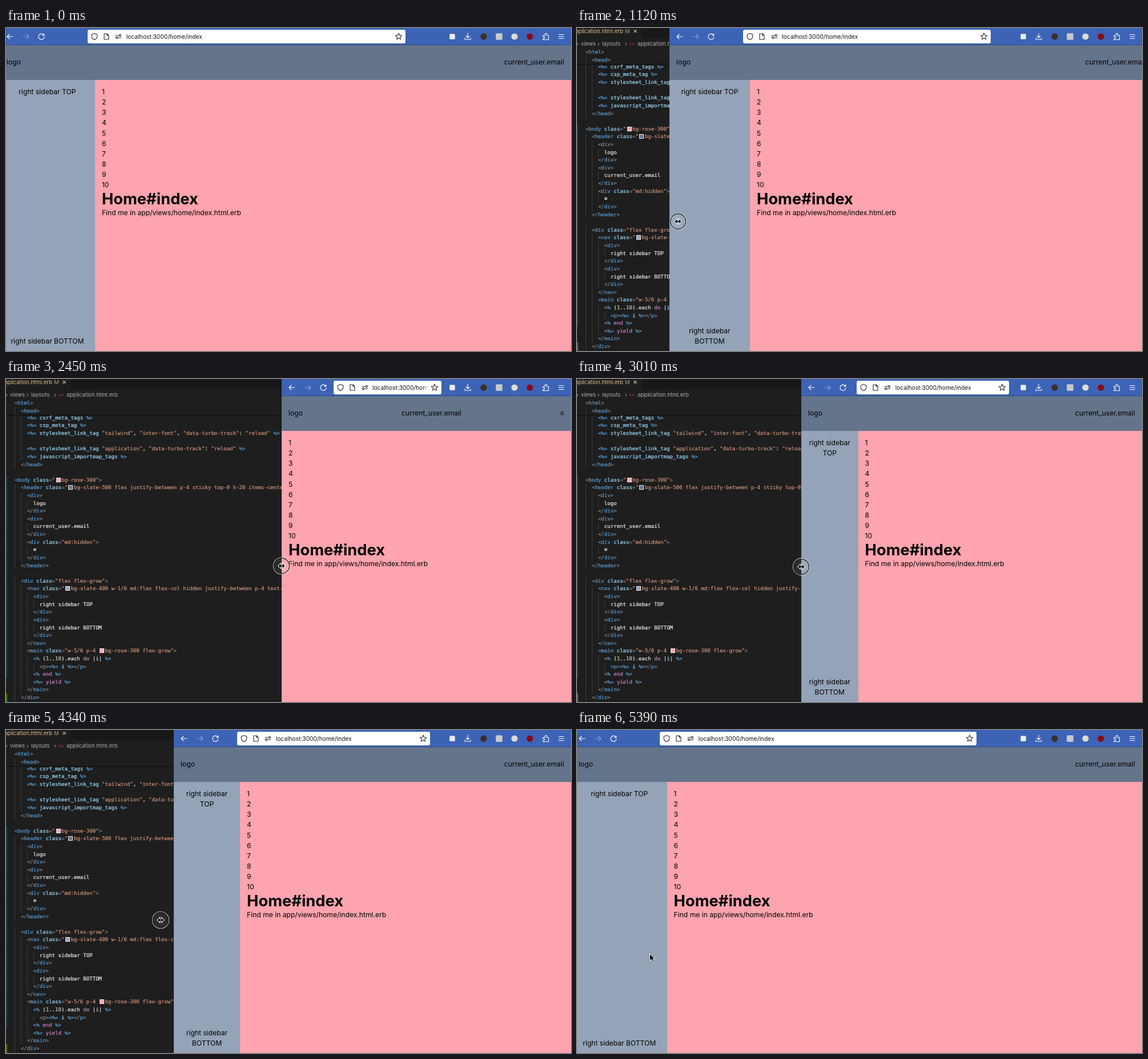
An HTML page for the animation above (5.46 s loop, 990x566 px).

```html
<!DOCTYPE html>
<html lang="en">
<head>
<meta charset="utf-8">
<title>Responsive layout demo</title>
<style>
* { box-sizing: border-box; margin: 0; padding: 0; }
html, body { width: 100%; height: 100%; overflow: hidden; background: #1e1e1e; }
body { position: relative; font-family: Inter, "Open Sans", sans-serif; }
svg { display: block; }
.abs, .icon, .line, .guide { position: absolute; }

#editor { inset: 0; width: 990px; height: 566px; overflow: hidden; background: #1e1e1e; }
#tabs { left: 0; right: 0; top: 0; height: 18px; background: #181818; }
#tab { left: 0; top: 0; width: 113px; height: 18px; background: #1e1e1e; }
.label { position: absolute; font-size: 9.6px; line-height: 14px; white-space: pre; color: #adadad; }
.line { font: 9.08px/13.62px "DejaVu Sans Mono", monospace; white-space: pre; color: #ececec; -webkit-text-stroke: .22px; }
.guide { width: 1px; height: 13.7px; background: #3c3c3c; }
.sw { display: inline-block; width: 8px; height: 8px; margin: 0 1.5px; border: 1px solid #eee; vertical-align: -1px; }

#win { top: 0; right: 0; height: 566px; overflow: hidden; background: #fda4ae; }
#bar { left: 0; right: 0; top: 0; height: 30px; background: #3c63b5; border-bottom: 1px solid #2d4b8d; }
#field { top: 2.5px; height: 24px; background: #fff; border-radius: 3px; box-shadow: 0 0 1px #0006; }
#url { left: 68px; right: 24px; top: 0; line-height: 24px; font-size: 10.24px; color: #15141a; white-space: pre; overflow: hidden; }
#url i { position: absolute; right: 0; top: 0; width: 9px; height: 24px; background: linear-gradient(90deg, #fff0, #fff); }
.icon { width: 16px; height: 16px; fill: none; stroke-width: 1.1; stroke-linecap: round; stroke-linejoin: round; }

#page { left: 0; top: 30px; height: 540px; display: flex; flex-direction: column; font-size: 12.11px; line-height: 18.16px; color: #000; }
#page header { flex: none; height: 60.8px; padding: 0 12.1px; display: flex; justify-content: space-between; align-items: center; background: #64748b; white-space: nowrap; }
#page section { flex: 1; display: flex; }
#page nav { flex: none; width: 16.6667%; padding: 12.1px; display: flex; flex-direction: column; justify-content: space-between; text-align: center; background: #94a3b8; }
#page main { flex: 1; min-width: 0; padding: 12.1px; background: #fda4ae; white-space: nowrap; }
#page h1 { position: relative; top: .5px; font-size: 27.25px; line-height: 30.3px; font-weight: 700; }
#page .burger { display: none; }
#page.small nav { display: none; }
#page.small .burger { display: block; }
#ring, #arrow { left: 0; top: 0; overflow: visible; }
</style>
</head>
<body>
<div id="editor" class="abs">
  <div id="tabs" class="abs"><div id="tab" class="abs"></div></div>
</div>
<div id="win" class="abs">
  <div id="bar" class="abs">
    <div id="field" class="abs"><div id="url" class="abs">localhost:3000/home/index<i></i></div></div>
  </div>
  <div id="page" class="abs">
    <header><div>logo</div><div>current_user.email</div><div class="burger">≡</div></header>
    <section>
      <nav><div>right sidebar TOP</div><div>right sidebar BOTTOM</div></nav>
      <main><div id="nums"></div><h1>Home#index</h1><p>Find me in app/views/home/index.html.erb</p></main>
    </section>
  </div>
</div>
<svg id="ring" class="abs" width="1" height="1">
  <circle r="14.5" fill="#fff1" stroke="#fff" stroke-opacity=".85" stroke-width="1.1"/>
  <circle r="13.6" fill="none" stroke="#111" stroke-width="1.2"/>
  <path d="M-5.6 0L-1.8-3.8V-1H1.8V-3.8L5.6 0L1.8 3.8V1H-1.8V3.8Z" fill="#000" stroke="#fff" stroke-width="1.8" paint-order="stroke"/>
</svg>
<svg id="arrow" class="abs" width="1" height="1">
  <path d="M0 0V10.4L2.4 8.2L4 12L5.7 11.3L4.1 7.6H7.3Z" fill="#000" stroke="#fff" stroke-width="1.4" paint-order="stroke"/>
</svg>
<script>
const $ = id => document.getElementById(id);
const LOOP = 5460, STEP = 70, STAGE = 990;
const CHAR = 5.47, ROW = 13.62, CODE_X = 15;

function add(parent, cls, html, style) {
  const el = document.createElement('div');
  el.className = cls;
  el.innerHTML = html;
  Object.assign(el.style, style);
  parent.append(el);
  return el;
}

// ---- editor ----
const esc = s => s.replace(/&/g, '&amp;').replace(/</g, '&lt;').replace(/>/g, '&gt;');
const paint = (s, color) => `<span style="color:${color}">${esc(s)}</span>`;
const GREY = '#808080', BLUE = '#569cd6', SKY = '#9cdcfe', CLAY = '#ce9178', PINK = '#c586c0', LIME = '#b5cea8';

function highlight(src) {
  const ruby = src.includes('<%');
  const token = /<%=?|%>|"[^"]*"|<\/?\w+|>|\bclass=|\b(?:do|end|yield)\b|\b\d+\b|\w+_\w+|[^<>"%\w]+|\w+|./g;
  return src.replace(token, s => {
    if (/^<%|^%>/.test(s)) return paint(s, BLUE);
    if (s[0] === '"') {
      return paint(s, CLAY).replace(/\{(\w+)\}/g, '<b class="sw" style="background:#$1"></b>');
    }
    if (s[0] === '<') {
      const [, open, name] = s.match(/(<\/?)(\w+)/);
      return paint(open, GREY) + paint(name, BLUE);
    }
    if (s === '>') return paint(s, GREY);
    if (s === 'class=') return paint('class', SKY) + paint('=', GREY);
    if (ruby && /^(do|end|yield)$/.test(s)) return paint(s, PINK);
    if (ruby && /^\d+$/.test(s)) return paint(s, LIME);
    if (ruby && /^(\w+_\w+|i)$/.test(s)) return paint(s, SKY);
    return esc(s);
  });
}

const code = `
    <%= csrf_meta_tags %>
    <%= csp_meta_tag %>
    <%= stylesheet_link_tag "tailwind", "inter-font", "data-turbo-track": "reload" %>
    
    <%= stylesheet_link_tag "application", "data-turbo-track": "reload" %>
    <%= javascript_importmap_tags %>
  </head>

<body class="{fda4af}bg-rose-300">
  <header class="{64748b}bg-slate-500 flex justify-between p-4 sticky top-0 h-20 items-center">
    <div>
      logo
    </div>
    <div>
      current_user.email
    </div>
    <div class="md:hidden">
      ≡
    </div>
  </header>

  <div class="flex flex-grow">
    <nav class="{94a3b8}bg-slate-400 w-1/6 md:flex flex-col hidden justify-between p-4 text-center">
      <div>
        right sidebar TOP
      </div>
      <div>
        right sidebar BOTTOM
      </div>
    </nav>
    <main class="w-5/6 p-4 {fda4af}bg-rose-300 flex-grow">
      <% (1..10).each do |i| %>
        <p><%= i %></p>
      <% end %>
      <%= yield %>
    </main>
  </div>`.split('\n').slice(1);

const editor = $('editor');
function codeLine(src, mid) {
  const col = src.search(/\S|$/), top = mid - ROW / 2 + 'px';
  for (let k = 0; k < col; k += 2) add(editor, 'guide', '', { left: CODE_X + k * CHAR + 'px', top });
  add(editor, 'line', highlight(src.slice(col)), { left: CODE_X + col * CHAR + 'px', top });
}
code.forEach((src, n) => codeLine(src, 68.6 + n * ROW));

// pinned rows above the scrolled code
add(editor, 'abs', '', { left: 0, right: 0, top: '35px', height: '28.5px', background: '#1e1e1e', borderBottom: '1px solid #0c0c0c' });
codeLine('<html>', 42.8);
codeLine('  <head>', 56.4);

const label = (text, x, y, color, more) =>
  add(editor, 'label', text, { left: x + 'px', top: y - 7 + 'px', color, ...more });
const TAN = '#e2c08d';
label('application.html.erb', 0, 5.5, TAN, { left: 'auto', right: STAGE - 81 + 'px' });
label('M', 84, 5.5, '#b59b74');
label('✕', 98, 5.5, '#ddd');
[['›', -1], ['views', 7], ['›', 36], ['layouts', 44], ['›', 84], ['application.html.erb', 106]]
  .forEach(([s, x]) => label(s, x, 27.5));
label('&lt;&gt;', 91, 27.5, '#c4473a', { fontSize: '8px' });

// change markers in the gutter
add(editor, 'abs', '', { left: 0, top: '170px', width: '2px', height: '354px', background: 'repeating-linear-gradient(#1b81a8 0 1.5px, #1e1e1e 1.5px 3px)' });
add(editor, 'abs', '', { left: 0, top: '551px', width: '2px', height: '15px', background: '#487e02' });

// ---- browser ----
function icon(parent, x, side, shape, color = '#fff', opacity = 1) {
  const y = parent.id === 'field' ? 4 : 7;
  parent.insertAdjacentHTML('beforeend',
    `<svg class="icon" viewBox="-8 -8 16 16" style="${side}:${x - 8}px;top:${y}px;stroke:${color};opacity:${opacity}">${shape}</svg>`);
}
const path = d => `<path d="${d}"/>`;
const dot = (r, color) => `<circle r="${r}" fill="${color}" stroke="none"/>`;
const box = (s, color) => `<rect x="${-s / 2}" y="${-s / 2}" width="${s}" height="${s}" rx="1.5" fill="${color}" stroke="none"/>`;
const bar = $('bar'), field = $('field'), INK = '#2b2a33';

icon(bar, 18, 'left', path('M5 0H-5M-1-4L-5 0L-1 4'));
icon(bar, 45.5, 'left', path('M-5 0H5M1-4L5 0L1 4'), '#fff', .4);
icon(bar, 72.5, 'left', path('M4.2-2.6A5 5 0 1 0 5 .6M4.8-5V-2H1.6'));

icon(field, 12, 'left', path('M0-5.5L4.8-3.8V-.5C4.8 2.6 2.4 4.6 0 5.6C-2.4 4.6-4.8 2.6-4.8-.5V-3.8Z'), INK);
icon(field, 33, 'left', path('M-4-5H1L4-2V5H-4ZM1-5V-2H4'), INK);
icon(field, 54.5, 'left', path('M-5-2H1M-1 2H5') +
  '<circle cx="3" cy="-2" r="1.6"/><circle cx="-3" cy="2" r="1.6"/>', INK);
let star = '';
for (let i = 0; i < 10; i++) {
  const r = i % 2 ? 2.8 : 6, a = i * Math.PI / 5;
  star += `${(r * Math.sin(a)).toFixed(1)},${(-r * Math.cos(a)).toFixed(1)} `;
}
icon(field, 12, 'right', `<polygon points="${star}"/>`, INK);

const tool = (x, shape) => icon(bar, STAGE - x, 'right', shape);
tool(782, box(9.5, '#e8edf8'));
tool(809, path('M0-6V2M-3-1L0 2L3-1M-5 2.5V5H5V2.5'));
tool(837, dot(5.7, '#3a2e25'));
tool(863.5, box(11.5, '#c9c9cb'));
tool(891, dot(5.6, '#dcdbd2'));
tool(918, dot(5.5, '#8a0816'));
tool(946, path('M-5-2H-1.6V-4A1.6 1.6 0 0 1 1.6-4V-2H4.6V5.5H-5V3.2H-3.6A1.5 1.5 0 0 0-3.6.2H-5Z'));
tool(972.5, path('M-4.5-3.5H4.5M-4.5 0H4.5M-4.5 3.5H4.5'));

for (let i = 1; i <= 10; i++) add($('nums'), '', i);

// ---- motion: [time, value] pairs ----
const edge = [
  [350, -11], [560, -7], [770, 2], [840, 12], [910, 31], [980, 62], [1050, 108], [1120, 162],
  [1190, 210], [1260, 252], [1330, 290], [1400, 323], [1470, 352], [1610, 397], [1750, 432],
  [1890, 460], [2030, 481], [2100, 485], [2380, 485], [2450, 483], [2590, 466], [2730, 432],
  [2870, 403], [3010, 393], [3290, 387], [3500, 387], [3640, 390], [3710, 432], [3780, 458],
  [3850, 470], [3920, 474], [4060, 474], [4130, 464], [4200, 424], [4270, 362], [4340, 294],
  [4480, 185], [4620, 100], [4760, 48], [4900, 18], [5040, 0], [5180, -9]
];
// how far the pointer runs ahead of the window edge
const lead = [[770, 3], [1120, 15], [1470, 7], [2100, 0], [3500, 0], [3640, 49], [3920, 0], [4060, 0], [4340, -23], [4620, -10], [5180, 0]];
const height = [[350, 345], [1120, 339], [1470, 332], [2450, 327.5], [3640, 330.5], [4340, 333], [5180, 337]];
const arrowAt = { 280: [60, 365], 350: [12, 346], 5320: [62, 366], 5390: [128, 393] };

function at(keys, t) {
  const i = keys.findIndex(k => k[0] >= t);
  if (i === 0) return keys[0][1];
  if (i < 0) return keys[keys.length - 1][1];
  const [t0, a] = keys[i - 1], [t1, b] = keys[i];
  return a + (b - a) * (t - t0) / (t1 - t0);
}

const win = $('win'), page = $('page'), ring = $('ring'), arrow = $('arrow');
function place(el, pos) {
  el.style.display = pos ? '' : 'none';
  if (pos) el.style.transform = `translate(${pos[0]}px,${pos[1]}px)`;
}

function draw(now) {
  const t = Math.floor(now % LOOP / STEP) * STEP;
  const x = Math.round(at(edge, t)), width = STAGE - x;
  // page layout trails the window while it shrinks
  const pageWidth = STAGE - Math.min(x, at(edge, t - 23));
  const spring = .1415 * Math.max(0, width - 557);

  win.style.left = x + 'px';
  win.style.width = width + 'px';
  field.style.left = 91 + spring + 'px';
  field.style.right = 227 + spring + 'px';
  page.style.width = pageWidth + 'px';
  page.classList.toggle('small', pageWidth < 581);

  place(arrow, arrowAt[t]);
  place(ring, t > 350 && t < 5320 && [x + at(lead, t), at(height, t)]);
  requestAnimationFrame(draw);
}
draw(0);
</script>
</body>
</html>
```
